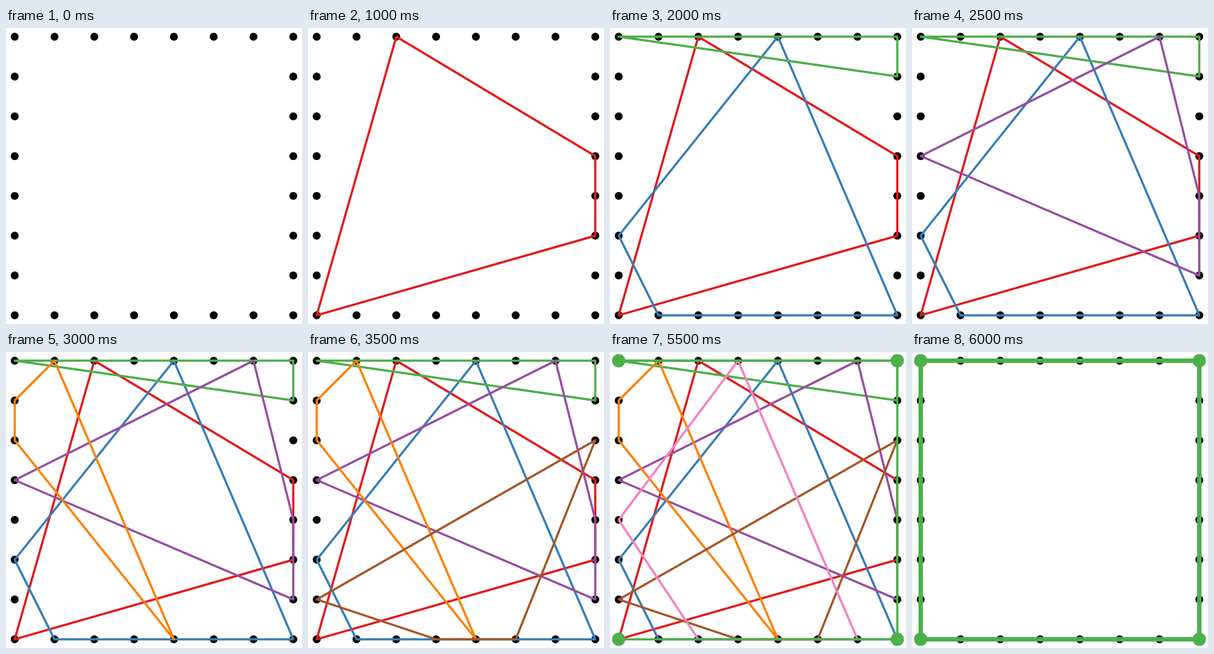
Recreate the animation shown at these times as an HTML page with a canvas. Size 500 by 500 pixels, loop 8 s.

```html
<!DOCTYPE html>
<html lang="en">
<head>
<meta charset="utf-8">
<title>Polygons on a square of dots</title>
<style>
  html, body { margin: 0; width: 100%; height: 100%; overflow: hidden; background: #fff; }
  canvas { display: block; width: 100vw; height: 100vh; }
</style>
</head>
<body>
<canvas id="stage" width="500" height="500"></canvas>
<script>
const SIZE = 500, LOOP = 8000, START = 1000, STEP = 500;
const SIDE = 7, UNIT = SIZE / 7.4375, MARGIN = (SIZE - SIDE * UNIT) / 2;
const DOT = UNIT / 10, KNOB = UNIT / 6, THIN = UNIT / 18;

// Keys in drawing order.
const colors = {
  red: '#e41a1c', blue: '#377eb8', green: '#4daf4a', violet: '#984ea3',
  orange: '#ff7f00', tan: '#a65628', pink: '#f781bf'
};
const names = Object.keys(colors);

// Initial of the colour owning each dot, clockwise from the top left, side by side.
const owners = 'gorpbgv' + 'ggtrvrv' + 'bptotpb' + 'rtbpvoo';

const ctx = document.getElementById('stage').getContext('2d');

// Position of the i-th dot, clockwise around the square.
function place(i) {
  const k = i % SIDE;
  const [x, y] = [[k, 0], [SIDE, k], [SIDE - k, SIDE], [0, SIDE - k]][Math.floor(i / SIDE)];
  return [MARGIN + x * UNIT, MARGIN + y * UNIT];
}

const ring = [...owners].map((_, i) => place(i));
const polygons = names.map(name => ring.filter((_, i) => owners[i] === name[0]));
const corners = [3, 2, 1, 0].map(n => ring[n * SIDE]);

function dot([x, y], radius, color) {
  ctx.beginPath();
  ctx.arc(x, y, radius, 0, Math.PI * 2);
  ctx.fillStyle = color;
  ctx.fill();
}

function line(points, color, width, closed) {
  ctx.beginPath();
  for (const point of points) ctx.lineTo(...point);
  if (closed) ctx.closePath();
  ctx.strokeStyle = color;
  ctx.lineWidth = width;
  ctx.stroke();
}

function draw(step) {
  const sides = step - names.length;
  const complete = sides === corners.length;

  ctx.fillStyle = '#fff';
  ctx.fillRect(0, 0, SIZE, SIZE);
  ctx.lineJoin = ctx.lineCap = 'round';
  for (const point of ring) dot(point, DOT, '#000');

  if (!complete) {
    names.slice(0, step).forEach((name, i) => line(polygons[i], colors[name], THIN, true));
  }
  if (sides > 0) {
    const path = corners.slice(0, sides + 1);
    line(path, colors.green, complete ? THIN * 2 : THIN, complete);
    for (const corner of path) dot(corner, KNOB, colors.green);
  }
}

const lastStep = names.length + corners.length;
const origin = performance.now();
let shown = -1;

function tick() {
  const t = (performance.now() - origin) % LOOP;
  const step = t < START ? 0 : Math.min(lastStep, 1 + Math.floor((t - START) / STEP));
  if (step !== shown) draw(shown = step);
  requestAnimationFrame(tick);
}
tick();
</script>
</body>
</html>
```
